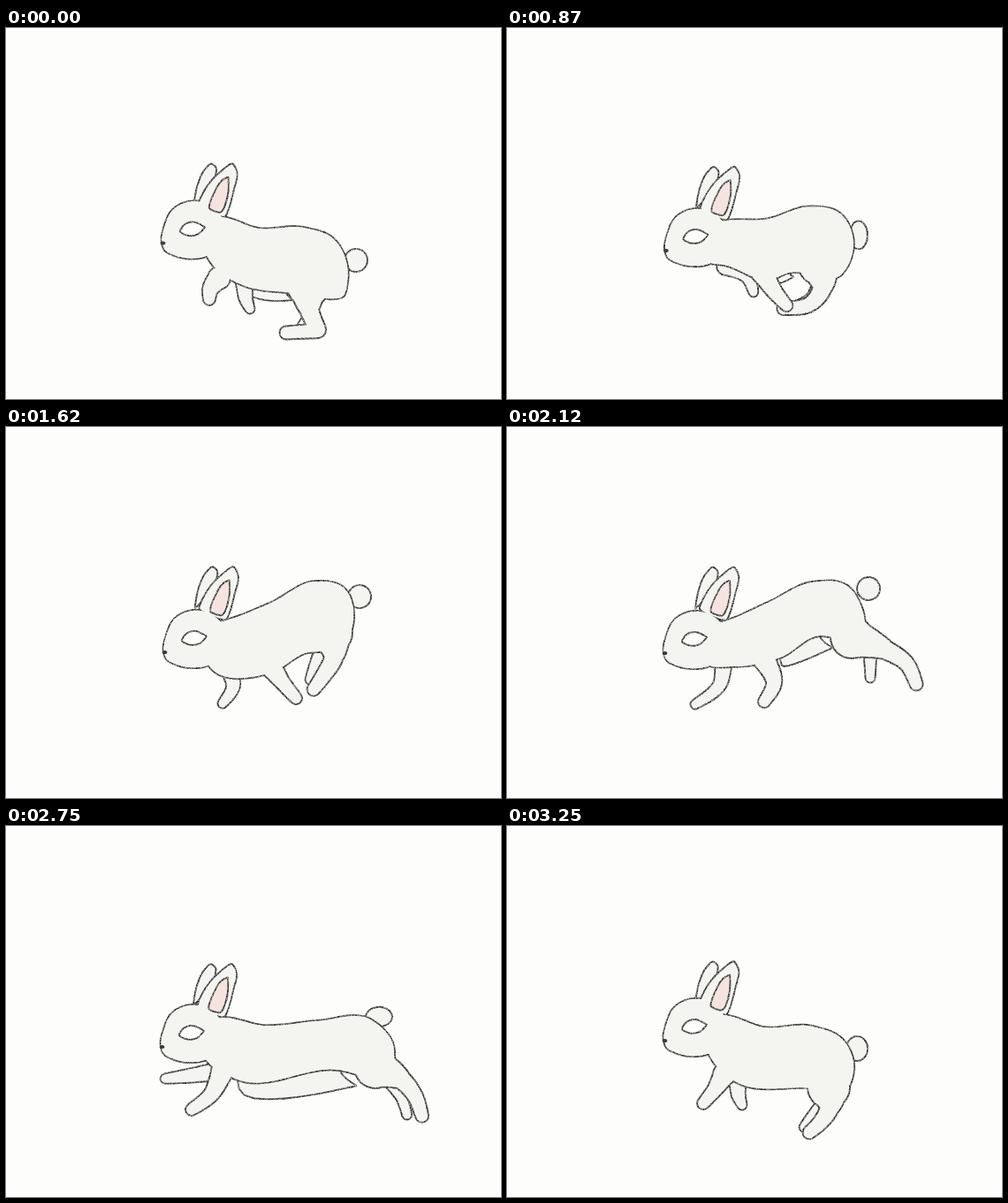
An HTML page with a canvas that plays this animation: 560x420 px, repeating every 3.37 s.

```html
<!DOCTYPE html>
<html lang="en">
<head>
<meta charset="utf-8">
<title>Running rabbit</title>
<style>
html, body { margin: 0; width: 100%; height: 100%; overflow: hidden; background: #fdfdfb; }
canvas { display: block; width: 560px; height: 420px; }
</style>
</head>
<body>
<canvas id="stage" width="560" height="420"></canvas>
<script>
const ctx = document.getElementById('stage').getContext('2d');
const LOOP = 3370, LAST = 26, STEPS = 10, HALF_LINE = 0.95;
const PAPER = '#fdfdfb', FUR = '#f4f5f0', PINK = '#f5e3e0';

const points = text => text.split(' ').map(p => p.split(',').map(Number));

// The head keeps its form: these are relative to the nose and the ear tip.
const HEAD = points('0,0 3,-20 12,-38 25,-46 40,-48 66,-34 70,0 52,15 31,18 13,14 3,8');
const EYE = points('21,-13 26,-21 35,-24 49,-18 41,-10 28,-9');
const EAR = points('-39,47 -30,27 -15,10 0,0 4,6 1,31 -9,60');
const FAR_EAR = points('-44,47 -40,25 -31,6 -24,0 -19,4 -19,12');
const PINK_EAR = points('-26,51 -20,31 -11,18 -5,15 -5,33 -14,55');

// Limb radii from root to tip.
const HIND = [24, 11, 9, 7.5], FRONT = [13, 9, 7], FAR_HIND = [8, 6.5, 5.5], FAR_FRONT = [10, 8, 5.5];

// Key poses of the run; `at` counts drawings, eight per second.
// `sag` is how far the far flank shows, `puff` the half width of the tail.
const poses = [
  { at: 0, sag: 8, puff: 13, nose: '176,243.5', tail: '396,263',
    torso: '285,226 335,225 371,238 387,270 383,303 317,300 268,292 238,274',
    hind: '342,292 343,318 353,342 317,345', farHind: '343,300 344,320 330,345',
    front: '241,283 231,296 230,307', farFront: '270,290 271,305 276,318' },
  { at: 4, sag: 10, puff: 10, nose: '179,250', tail: '396,241',
    torso: '285,223 338,213 372,217 391,252 377,288 312,292 285,290 250,274',
    hind: '340,284 336,308 335,331 302,332', farHind: '340,300 336,320 320,331',
    front: '275,280 276,303 275,319', farFront: '243,262 257,272 268,281' },
  { at: 9, sag: 0, puff: 10, nose: '178,253.5', tail: '399,230',
    torso: '298,211 345,194 378,202 394,238 378,276 325,268 305,283 244,266',
    hind: '362,256 371,283 350,299 320,308', farHind: '365,270 350,295 322,308',
    front: '298,274 322,297 344,311', farFront: '250,275 284,290 286,311' },
  { at: 13, sag: 0, puff: 13, nose: '178,255', tail: '400,192',
    torso: '300,198 350,174 382,181 394,216 379,250 338,257 300,279 230,272',
    hind: '368,233 371,259 358,283 348,297', farHind: '358,250 350,268 344,286',
    front: '299,270 312,288 328,307', farFront: '252,274 257,293 245,313' },
  { at: 17, sag: 13, puff: 13, nose: '177,256', tail: '409,183',
    torso: '297,197 345,175 385,179 403,207 404,255 354,237 309,262 255,272',
    hind: '390,238 428,252 453,269 463,291', farHind: '411,255 411,270 411,284',
    front: '291,263 302,290 291,311', farFront: '245,268 241,291 213,314' },
  { at: 22, sag: 17, puff: 15, nose: '175,250', tail: '422,216',
    torso: '290,225 352,220 412,218 438,245 432,292 378,277 262,288 230,270',
    hind: '418,273 446,287 461,307 467,328', farHind: '437,292 446,308 450,327',
    front: '245,277 232,304 210,321', farFront: '232,279 205,283 180,286' },
  { at: LAST, sag: 0, puff: 12, nose: '177,243', tail: '396,252',
    torso: '290,227 345,226 380,241 393,270 386,297 338,297 258,290 238,274',
    hind: '364,296 365,318 355,335 342,347', farHind: '357,315 343,332 336,341',
    front: '246,281 236,297 222,314', farFront: '261,290 262,305 266,316' }
];
for (const pose of poses)
  for (const key in pose) if (typeof pose[key] === 'string') pose[key] = points(pose[key]);

const mix = (a, b, k) => Array.isArray(a) ? a.map((v, i) => mix(v, b[i], k)) : a + (b - a) * k;
const bump = (x, mid, width) => Math.max(0, 1 - Math.abs(x - mid) / width);
const shift = (pts, [x, y]) => pts.map(p => [p[0] + x, p[1] + y]);

function poseAt(n) {
  const i = Math.max(1, poses.findIndex(p => p.at >= n));
  const a = poses[i - 1], b = poses[i], out = {};
  for (const key in a) out[key] = mix(a[key], b[key], (n - a.at) / (b.at - a.at));
  // The hind feet kick far back, then swing low on the way forward.
  const dx = 18 * bump(n, 20, 2.5), dy = 29 * bump(n, 24, 1.35);
  for (const leg of [out.hind, out.farHind])
    leg.forEach((p, j) => {
      const k = j / (leg.length - 1);
      p[0] += dx * k;
      p[1] += dy * k;
    });
  return out;
}

let seed = 1;
function rnd() {
  seed = (seed * 1664525 + 1013904223) >>> 0;
  return seed / 4294967296;
}

function makeGrain() {
  const tile = document.createElement('canvas'), size = tile.width = tile.height = 96;
  const g = tile.getContext('2d');
  for (let i = 0; i < size * size; i++) {
    const v = 45 + 115 * rnd() ** 1.4;
    g.fillStyle = `rgb(${v},${v},${v})`;
    g.fillRect(i % size, Math.floor(i / size), 1, 1);
  }
  return ctx.createPattern(tile, 'repeat');
}
const GRAIN = makeGrain();

// Tangent follows the neighbours and fades to zero at sharp corners.
function tangent(prev, p, next) {
  const ax = p[0] - prev[0], ay = p[1] - prev[1], bx = next[0] - p[0], by = next[1] - p[1];
  const da = Math.hypot(ax, ay) || 1, db = Math.hypot(bx, by) || 1;
  const tx = ax / da * db + bx / db * da, ty = ay / da * db + by / db * da;
  const soft = Math.min(1, Math.max(0, 0.45 + 1.2 * (ax * bx + ay * by) / (da * db)));
  const len = Math.hypot(tx, ty) || 1;
  return [tx / len * soft, ty / len * soft];
}

function smooth(pts, closed) {
  const n = pts.length, out = [];
  const get = i => closed ? pts[(i + n) % n] : pts[Math.min(n - 1, Math.max(0, i))];
  const tan = pts.map((p, i) => tangent(get(i - 1), p, get(i + 1)));
  for (let i = 0; i < (closed ? n : n - 1); i++) {
    const p = pts[i], q = get(i + 1), u = tan[i], v = tan[(i + 1) % n];
    const h = Math.hypot(q[0] - p[0], q[1] - p[1]) / 3;
    for (let s = 0; s < STEPS; s++) {
      const t = s / STEPS, r = 1 - t;
      out.push([0, 1].map(c => r * r * r * p[c] + 3 * r * r * t * (p[c] + u[c] * h) +
        3 * r * t * t * (q[c] - v[c] * h) + t * t * t * q[c]));
    }
  }
  if (!closed) out.push(pts[n - 1]);
  return out;
}

// Shapes are functions that add themselves to the path, grown by `grow`.
function blob(pts) {
  const line = smooth(pts, true), n = line.length;
  return grow => line.forEach(([x, y], i) => {
    const p = line[(i + n - 1) % n], q = line[(i + 1) % n];
    const dx = q[0] - p[0], dy = q[1] - p[1], len = Math.hypot(dx, dy) || 1;
    const off = grow + (rnd() - 0.5) * 0.3;
    ctx[i ? 'lineTo' : 'moveTo'](x + dy / len * off, y - dx / len * off);
  });
}

function limb(joints, radii) {
  const line = smooth(joints, false);
  return grow => line.forEach(([x, y], i) => {
    const j = Math.min(radii.length - 2, Math.floor(i / STEPS));
    const r = mix(radii[j], radii[j + 1], i / STEPS - j) + grow;
    ctx.moveTo(x + r, y);
    ctx.arc(x, y, r, 0, Math.PI * 2);
  });
}

function paint(shapes, color, grow) {
  ctx.fillStyle = color;
  for (const shape of shapes) {
    ctx.beginPath();
    shape(grow);
    ctx.fill();
  }
}

// Shapes inked together share one outline.
function ink(shapes, color = FUR) {
  paint(shapes, GRAIN, HALF_LINE);
  paint(shapes, color, -HALF_LINE);
}

function draw(n) {
  seed = n * 977 + 5;
  const pose = poseAt(n), { torso, sag, puff } = pose, nose = pose.nose[0], [tx, ty] = pose.tail[0];
  // Ears follow the nod of the head at about half its range.
  const tip = [257 + (nose[0] - 177) * 0.6, 153.5 + (nose[1] - 243) * 0.4];
  const [haunch, elbow] = torso.slice(5, 7);
  const neck = shift([[50, 14], [45, -30]], nose);

  const tail = Array.from({ length: 10 }, (_, i) =>
    [tx + puff * Math.cos(i * Math.PI / 5), ty + (26 - puff) * Math.sin(i * Math.PI / 5)]);
  const flank = [elbow, [haunch[0], haunch[1] - sag], haunch,
    [haunch[0] + sag * 1.1, haunch[1] + sag], [elbow[0] + 2, elbow[1] + sag * 0.6]];
  const body = blob([[tip[0] - 9, tip[1] + 60], ...torso, ...neck]);
  const head = blob(shift(HEAD, nose));

  ctx.fillStyle = PAPER;
  ctx.fillRect(0, 0, 560, 420);
  ink([blob(tail)]);
  ink([blob(shift(FAR_EAR, tip))]);
  if (sag > 1) ink([blob(flank)]);
  ink([limb(pose.farHind, FAR_HIND)]);
  ink([limb(pose.farFront, FAR_FRONT)]);
  ink([body, head, blob(shift(EAR, tip)), limb(pose.hind, HIND)]);
  ink([limb(pose.front, FRONT)]);
  paint([body, head], FUR, -HALF_LINE);
  ink([blob(shift(PINK_EAR, tip))], PINK);
  ink([blob(shift(EYE, nose))], PAPER);

  ctx.beginPath();
  ctx.ellipse(nose[0] + 1.5, nose[1], 2.8, 2, 0, 0, Math.PI * 2);
  ctx.fillStyle = '#3c3c3c';
  ctx.fill();
}

let shown = -1;
const start = performance.now();
function tick() {
  // Each drawing is held for an eighth of a second, in whole hundredths.
  const t = Math.floor((performance.now() - start) % LOOP / 10) * 10;
  const n = Math.min(LAST, Math.floor((t + 5) / 125));
  if (n !== shown) draw(shown = n);
  requestAnimationFrame(tick);
}
tick();
</script>
</body>
</html>
```
